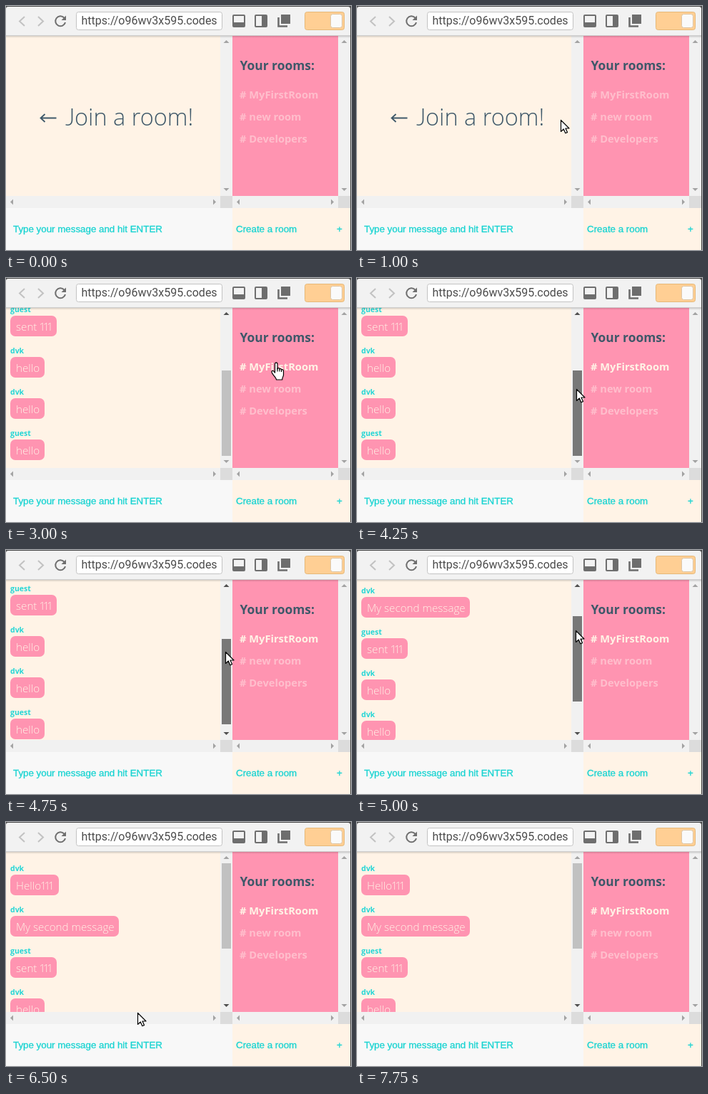
Recreate the animation shown at these times as an HTML page. Size 483 px wide and 343 px high, loop 8 s.

```html
<!DOCTYPE html>
<html lang="en">
<head>
<meta charset="utf-8">
<title>Chat room</title>
<style>
html, body { margin: 0; width: 100%; height: 100%; overflow: hidden; background: #fff; }
svg { display: block; }
text { white-space: pre; }
.ui { font-family: "Open Sans", "Noto Sans", sans-serif; }
.head { font-size: 17.4px; font-weight: 700; fill: #3e5869; }
.room { font-size: 14.65px; font-weight: 700; fill: #ffbecc; }
.name { font-size: 10.5px; font-weight: 700; fill: #25d6d6; }
.msg { font-size: 15.2px; font-weight: 300; fill: #fff3e6; }
.title { font-size: 32.5px; font-weight: 300; fill: #3e5869; }
.field { font: 13.3333px "Liberation Sans", Arial, sans-serif; fill: #1cd4d2; stroke: #1cd4d2; stroke-width: .35; }
.url { font: 16px Roboto, sans-serif; fill: #4c4c4c; }
</style>
</head>
<body>
<svg width="483" height="343" viewBox="0 0 483 343">
  <defs>
    <clipPath id="chatClip"><rect y="42" width="300" height="225"/></clipPath>
    <clipPath id="urlClip"><rect x="100" y="10" width="195" height="22"/></clipPath>
    <linearGradient id="shade" x2="0" y2="1">
      <stop stop-color="#000" stop-opacity=".16"/><stop offset="1" stop-color="#000" stop-opacity="0"/>
    </linearGradient>
  </defs>

  <rect width="483" height="343" fill="#4a4a4a"/>
  <path d="M0 343V4Q0 1 3 1H479Q482 1 482 4V343Z" fill="#f2f2f2"/>

  <!-- panels -->
  <rect y="42" width="300" height="225" fill="#fff3e6"/>
  <rect x="317" y="42" width="148" height="225" fill="#ff94b1"/>
  <rect y="284" width="317" height="59" fill="#f8f8f8"/>
  <rect x="317" y="284" width="165" height="59" fill="#fff3e6"/>

  <g id="join">
    <path d="M70.5 157.5H49M54.5 152L48.5 157.5L54.5 163" fill="none" stroke="#3e5869" stroke-width="1.8"/>
    <text class="title" y="168"><tspan x="83" font-family="Lato, sans-serif">J</tspan><tspan x="96" class="ui">oin a room!</tspan></text>
  </g>
  <g clip-path="url(#chatClip)"><g id="list" class="ui"></g></g>

  <g class="ui">
    <text class="head" x="327.5" y="90">Your rooms:</text>
    <text class="room" id="first" x="327" y="130">#&#160;MyFirstRoom</text>
    <text class="room" x="327" y="161">#&#160;new room</text>
    <text class="room" x="327" y="192">#&#160;Developers</text>
  </g>
  <g class="field">
    <text x="10" y="318">Type your message and hit ENTER</text>
    <text x="322" y="318">Create a room</text>
    <text x="463" y="318">+</text>
  </g>

  <!-- scroll bars -->
  <path d="M300 42h17v225h-17zM0 267h300v17H0zM465 42h17v225h-17zM317 267h148v17h-148z" fill="#f1f1f1"/>
  <path d="M300 267h17v17h-17zM465 267h17v17h-17z" fill="#dcdcdc"/>
  <rect id="thumb" x="302" width="13" height="120"/>
  <g id="arrows"></g>

  <!-- toolbar -->
  <rect y="41" width="482" height="1" fill="#cfcfcf"/>
  <rect y="42" width="482" height="3" fill="url(#shade)"/>
  <g fill="none" stroke-width="2">
    <path d="M26 15L19 21.5L26 28M45 15L52 21.5L45 28" stroke="#c2c2c2"/>
    <path d="M81.3 16.5A7 7 0 1 0 83 23" stroke="#6e6e6e"/>
  </g>
  <path d="M84 13.5V20H77.5Z" fill="#6e6e6e"/>
  <rect x="98.5" y="8.5" width="204" height="25" rx="3" fill="#fff" stroke="#c3c3c3"/>
  <g clip-path="url(#urlClip)"><text class="url" x="105.5" y="26">https://o96wv3x595.codes</text></g>
  <g fill="none" stroke="#6e6e6e" stroke-width="2">
    <rect x="318" y="13" width="16" height="16" rx="1"/>
    <rect x="349" y="13" width="16" height="16" rx="1"/>
    <path d="M381.5 16V28.5H394" stroke-width="2.6"/>
  </g>
  <path d="M318 23h16v6h-16zM358 13h7v16h-7zM385 12h13v13h-13z" fill="#6e6e6e"/>
  <rect x="418.5" y="8.5" width="55" height="25" rx="3" fill="#ffcf94" stroke="#e5b878"/>
  <rect x="454.5" y="11.5" width="16" height="19" rx="3" fill="#fafafa" stroke="#ddc5a4"/>

  <!-- pointers -->
  <g id="arrow" stroke="#000" stroke-linejoin="round">
    <path d="M.5 .5V16.5L4.3 13L6.8 18.8L9.5 17.6L7 12H12Z" fill="#fff" stroke-width="1.2"/>
  </g>
  <g id="hand" stroke="#000" stroke-width="1.2" stroke-linejoin="round">
    <path d="M-1.5 3C-1.5 .2 2 .2 2 3V10C2 8 5 8 5 10.5C5 9 7.6 9 7.6 11.5C7.6 10 10.5 10.3 10.5 13V18C10.5 20.5 8.7 21.5 8.7 25H.5C.5 22-5 18-6 14.5C-6.5 12.2-4 11.7-3 13.2L-1.5 15Z" fill="#fff"/>
    <path d="M2 9V13.5M5 10.5V13.5M7.6 11.5V14" fill="none"/>
  </g>
  <path id="beam" d="M-3-8H-1Q0-8 0-7Q0-8 1-8H3M0-7V7M-3 8H-1Q0 8 0 7Q0 8 1 8H3" fill="none" stroke="#222"/>
</svg>
<script>
const LOOP = 8000, STEP = 250, ROW = 58, MAX_SCROLL = 137;
const $ = id => document.getElementById(id);

// name, text, digits, bubble width
const messages = [
  ["dvk", "Hello", "111", 68],
  ["dvk", "My second message", "", 152],
  ["guest", "sent ", "111", 65],
  ["dvk", "hello", "", 48],
  ["dvk", "hello", "", 48],
  ["guest", "hello", "", 48]
];
$("list").innerHTML = messages.map(([name, text, digits, w], i) => {
  const tail = digits && `<tspan dx="-1" letter-spacing="-3.2">${digits}</tspan>`;
  return `<g transform="translate(6 ${74 + i * ROW})">
    <text class="name" y="-5">${name}</text>
    <rect width="${w}" height="29" rx="7" fill="#ff94b1"/>
    <text class="msg" x="8" y="20.5">${text}${tail}</text></g>`;
}).join("");

// x, y, rotation, id
const tips = [
  [308.5, 50, 0, "up"], [308.5, 258, 180, "down"],
  [8, 275.5, -90], [292, 275.5, 90],
  [473.5, 50, 0], [473.5, 258, 180],
  [325, 275.5, -90], [457, 275.5, 90]
];
$("arrows").innerHTML = tips.map(([x, y, r, id]) =>
  `<path ${id ? `id="${id}"` : ""} d="M-4 2L0-2L4 2Z" fill="#a3a3a3" transform="translate(${x} ${y}) rotate(${r})"/>`
).join("");

// time, x, y of the pointer's hot spot
const path = [
  [500, 146, 169], [1000, 285, 160], [1500, 388, 135], [1750, 378, 118],
  [3250, 378, 118], [4250, 307, 156], [4500, 307, 152], [4750, 307, 143],
  [5250, 305, 83], [5750, 306, 68], [6000, 292, 112], [6500, 184, 268], [7000, 188, 312]
];
// time, scroll offset
const scrolling = [[4250, MAX_SCROLL], [4500, 134], [4750, 127], [5000, 66], [5250, 0]];

function along(keys, t) {
  if (t <= keys[0][0]) return keys[0].slice(1);
  for (let i = 1; i < keys.length; i++) {
    const a = keys[i - 1], b = keys[i];
    if (t <= b[0]) {
      const k = (t - a[0]) / (b[0] - a[0]);
      return a.slice(1).map((v, j) => v + (b[j + 1] - v) * k);
    }
  }
  return keys[keys.length - 1].slice(1);
}

function show(id, on) {
  $(id).style.display = on ? "" : "none";
}

function drawPointer(t, x, y) {
  const on = t >= 500 && t < 7250;
  const kind = y > 284 ? "beam" : x > 327 && y > 110 ? "hand" : "arrow";
  for (const id of ["arrow", "hand", "beam"]) {
    show(id, on && id === kind);
    $(id).setAttribute("transform", `translate(${Math.round(x)} ${Math.round(y)})`);
  }
}

function draw(t) {
  const open = t >= 3000;
  const [x, y] = along(path, t);
  const [offset] = along(scrolling, t);
  show("join", !open);
  show("list", open);
  show("thumb", open);
  $("first").style.fill = open ? "#fff3e6" : "";
  $("list").setAttribute("transform", `translate(0 ${-Math.round(offset)})`);
  $("thumb").setAttribute("y", Math.round(58 + 72 * offset / MAX_SCROLL));
  const held = t >= 4250 && t < 5750;
  const over = x >= 300 && x < 317 && y < 267;
  $("thumb").setAttribute("fill", held ? "#787878" : over ? "#a8a8a8" : "#c1c1c1");
  $("up").setAttribute("fill", open && offset > 0 ? "#505050" : "#a3a3a3");
  $("down").setAttribute("fill", open && offset < MAX_SCROLL ? "#505050" : "#a3a3a3");
  drawPointer(t, x, y);
}

const start = performance.now();
function tick() {
  const t = (performance.now() - start) % LOOP;
  draw(Math.floor(t / STEP) * STEP);
  requestAnimationFrame(tick);
}
tick();
</script>
</body>
</html>
```
